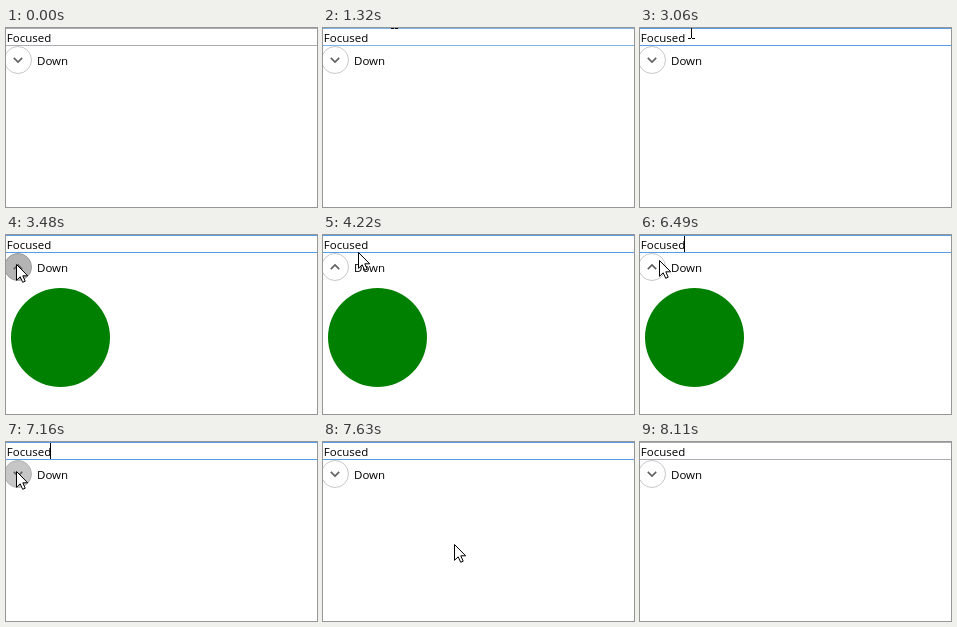
These frames come from a looping animation (311 by 179 pixels, 8.18 s). An HTML page:

```html
<!DOCTYPE html>
<html lang="en">
<head>
<meta charset="utf-8">
<title>Focus and expander</title>
<style>
  html, body { margin: 0; width: 100%; height: 100%; overflow: hidden; background: #fff; }
  svg { display: block; width: 311px; height: 179px; }
  text { font: 11.5px "Open Sans", "Noto Sans", sans-serif; fill: #000; }
</style>
</head>
<body>
<svg viewBox="0 0 311 179">
  <path id="border" d="M0 .5H311M0 17.5H311" fill="none"/>
  <text x=".8" y="14">Focused</text>
  <rect id="caret" x="44" y="1" width="1" height="16"/>
  <circle id="button" cx="12" cy="32" r="13.5"/>
  <path id="chevron" d="M-4.2 -2.1L0 2.1L4.2 -2.1" fill="none" stroke="#606060" stroke-width="1.6"/>
  <text x="31" y="37">Down</text>
  <circle id="content" cx="54.5" cy="102.5" r="49.5" fill="#008000"/>
  <path id="arrow" d="M.5 .5V16.3L4.2 12.8L6.7 18.3L9.2 17.2L6.8 11.8H11.7Z" fill="#fff" stroke="#000"/>
  <path id="beam" d="M-3 -6.5H0M1 -6.5H4M.5 -6V7M-3 7.5H0M1 7.5H4" fill="none" stroke="#000"/>
</svg>
<script>
const LOOP = 8180, TICK = 70, LAG = 2 * TICK;
const ENTER = 1320, FOCUS = 1660, LEAVE = 7910, BLUR = 8110;
const BLINK = 458;

const el = id => document.getElementById(id);
const [border, caret, button, chevron, content, arrow, beam] =
  ["border", "caret", "button", "chevron", "content", "arrow", "beam"].map(el);

const outside = { x: 71, y: -14 };
const onButton = { x: 10, y: 29 };
const moves = [
  { at: ENTER, ticks: 3, to: { x: 71, y: 7 } },
  { at: 2590, ticks: 2, to: { x: 51, y: 3 } },
  { at: 3130, ticks: 4, to: onButton },
  { at: 4010, ticks: 7, to: { x: 54, y: 8 } },
  { at: 6010, ticks: 4, to: { x: 38, y: 16 } },
  { at: 6420, ticks: 3, to: onButton },
  { at: 7420, ticks: 7, to: { x: 222, y: 156 } }
];

const show = (node, on) => node.setAttribute("visibility", on ? "visible" : "hidden");
const mix = (a, b, k) => Math.round(a + (b - a) * k);
const set = (node, attrs) => {
  for (const key in attrs) node.setAttribute(key, attrs[key]);
};

function pointerAt(t) {
  const i = moves.findLastIndex(move => t >= move.at);
  if (i < 0) return outside;
  const { at, ticks, to } = moves[i];
  const from = i ? moves[i - 1].to : outside;
  const k = Math.min(1, (Math.floor((t - at) / TICK) + 1) / ticks);
  return { x: mix(from.x, to.x, k), y: mix(from.y, to.y, k) };
}

// Each arrival on the button is followed by a click
function isOpen(t) {
  const clicks = moves.filter(({ at, ticks, to }) =>
    to === onButton && t >= at + (ticks - 1) * TICK + LAG);
  return clicks.length % 2 === 1;
}

// The button reacts a little later than the pointer moves
function isHovered(t) {
  const { x, y } = pointerAt(t - LAG);
  return Math.hypot(x - 12, y - 32) < 14;
}

function draw(t) {
  const focused = t >= FOCUS && t < BLUR;
  const open = isOpen(t), hover = isHovered(t);
  const { x, y } = pointerAt(t);
  const present = t < LEAVE, overBox = y < 17;

  set(border, { stroke: focused ? "#569de5" : t >= ENTER && t < BLUR ? "#7eb4ea" : "#abadb3" });
  show(caret, focused && Math.floor((t - FOCUS) / BLINK) % 2 === 0);
  set(button, {
    fill: !hover ? "#fff" : open ? "#b4b4b4" : "#c6c6c6",
    stroke: !hover ? "#c8c8c8" : open ? "#999" : "#b4b4b4"
  });
  set(chevron, { transform: `translate(12 32) scale(1 ${open ? -1 : 1})` });
  show(content, open);
  show(beam, present && overBox);
  show(arrow, present && !overBox);
  set(overBox ? beam : arrow, { transform: `translate(${x} ${y})` });
}

const start = performance.now();
function frame() {
  draw((performance.now() - start) % LOOP);
  requestAnimationFrame(frame);
}
frame();
</script>
</body>
</html>
```
